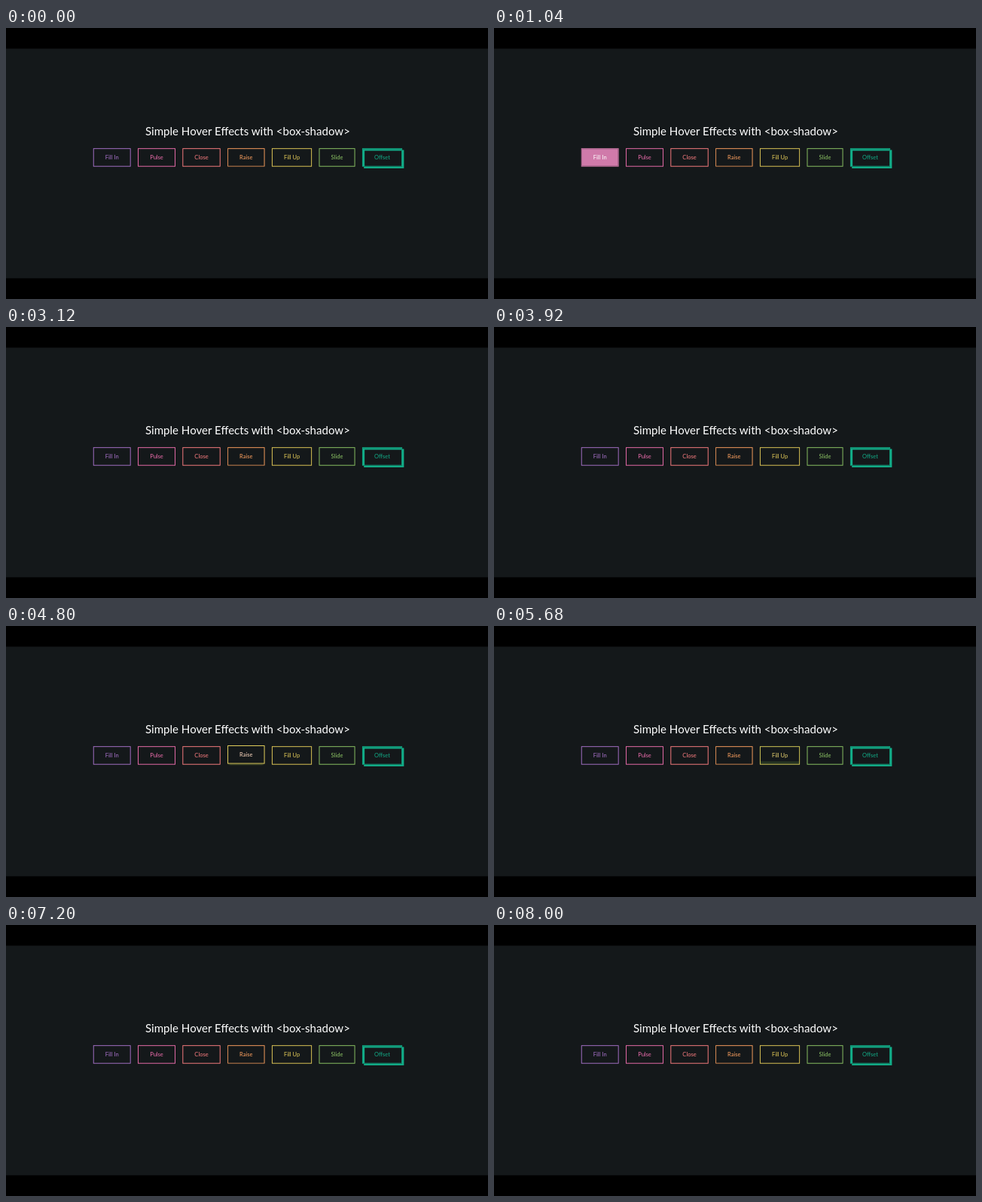
These frames come from a looping animation (640 px wide and 361 px high, 8080 ms). An HTML page:

```html
<!DOCTYPE html>
<html lang="en">
<head>
<meta charset="utf-8">
<title>Simple hover effects</title>
<style>
html, body { margin: 0; width: 100%; height: 100%; overflow: hidden; background: #000; }
.stage { position: relative; width: 640px; height: 361px; overflow: hidden; background: #000; }
/* A 1360px wide page shrunk to the stage width. */
.page {
  position: absolute; top: 0; left: 0; width: 1360px; height: 650px; background: #14181a;
  transform-origin: 0 0; transform: translateY(27.5px) scale(.470588);
  font: 16px/1 Lato, sans-serif;
}
h1, .row { position: absolute; left: 2px; width: 100%; margin: 0; }
h1 { top: 213px; color: #fff; font-size: 32px; font-weight: 400; line-height: 40px; text-align: center; }
.row { top: 281.5px; display: flex; justify-content: center; gap: 20px; }
.btn {
  width: var(--w); height: 52px; box-sizing: border-box; padding: 16px 0;
  border: 2px solid var(--color); color: var(--color);
  text-align: center; white-space: nowrap;
  animation: 8.08s var(--at) infinite;
}
.fill   { --w: 106px; --at: .76s; --color: #a972cb; --hover: #d07aaa; animation-name: tint, fill; }
.pulse  { --w: 106px; --at: 1.75s; --color: #ef6eae; --hover: #ef8f6a; animation-name: long-tint, pulse; }
.close  { --w: 107px; --at: 3.17s; --color: #ff7f82; --hover: #f8d67f; animation-name: tint, close; }
.raise  { --w: 105px; --at: 4.3s; --color: #ffa260; --hover: #e5ff60; animation-name: tint, raise; }
.up     { --w: 113px; --at: 5.1s; --color: #e4cb58; --hover: #8ddc5a; animation-name: tint, up; }
.slide  { --w: 102px; --at: 6.2s; --color: #8fc866; --hover: #5cba87; animation-name: tint, slide; }
.offset {
  --w: 113px; --at: 7.28s; --color: #12ad88; --hover: #1976b8; animation-name: tint, offset;
  box-shadow: .3em .3em 0 0 var(--color), inset .3em .3em 0 0 var(--color);
}

/* Each hover eases in for 250 ms, holds until 440 ms and eases out by 690 ms. */
@keyframes tint {
  3.094%, 5.445% { color: #fff; border-color: var(--hover); }
  8.54%, 100% { color: var(--color); border-color: var(--color); }
}
@keyframes long-tint {
  3.094%, 11.757% { color: #fff; border-color: var(--hover); }
  14.851%, 100% { color: var(--color); border-color: var(--color); }
}
@keyframes fill {
  3.094%, 5.445% { box-shadow: inset 0 0 0 2em var(--hover); }
  8.54%, 100% { box-shadow: none; }
}
@keyframes pulse {
  0% { box-shadow: 0 0 0 0 var(--hover); }
  12.376%, 100% { box-shadow: 0 0 0 2em transparent; }
}
@keyframes close {
  3.094%, 5.445% { box-shadow: inset -3.5em 0 0 0 var(--hover), inset 3.5em 0 0 0 var(--hover); }
  8.54%, 100% { box-shadow: none; }
}
@keyframes raise {
  3.094%, 5.445% { box-shadow: 0 .5em .5em -.4em var(--hover); transform: translateY(-.25em); }
  8.54%, 100% { box-shadow: none; transform: none; }
}
@keyframes up {
  3.094%, 5.445% { box-shadow: inset 0 -3.25em 0 0 var(--hover); }
  8.54%, 100% { box-shadow: none; }
}
@keyframes slide {
  3.094%, 5.445% { box-shadow: inset 6.5em 0 0 0 var(--hover); }
  8.54%, 100% { box-shadow: none; }
}
@keyframes offset {
  3.094%, 5.445% { box-shadow: 0 0 0 0 var(--hover), inset 7em 3.5em 0 0 var(--hover); }
  8.54%, 100% { box-shadow: .3em .3em 0 0 var(--color), inset .3em .3em 0 0 var(--color); }
}
</style>
</head>
<body>
<div class="stage">
  <div class="page">
    <h1>Simple Hover Effects with &lt;box-shadow&gt;</h1>
    <div class="row">
      <div class="btn fill">Fill In</div>
      <div class="btn pulse">Pulse</div>
      <div class="btn close">Close</div>
      <div class="btn raise">Raise</div>
      <div class="btn up">Fill Up</div>
      <div class="btn slide">Slide</div>
      <div class="btn offset">Offset</div>
    </div>
  </div>
</div>
</body>
</html>
```
